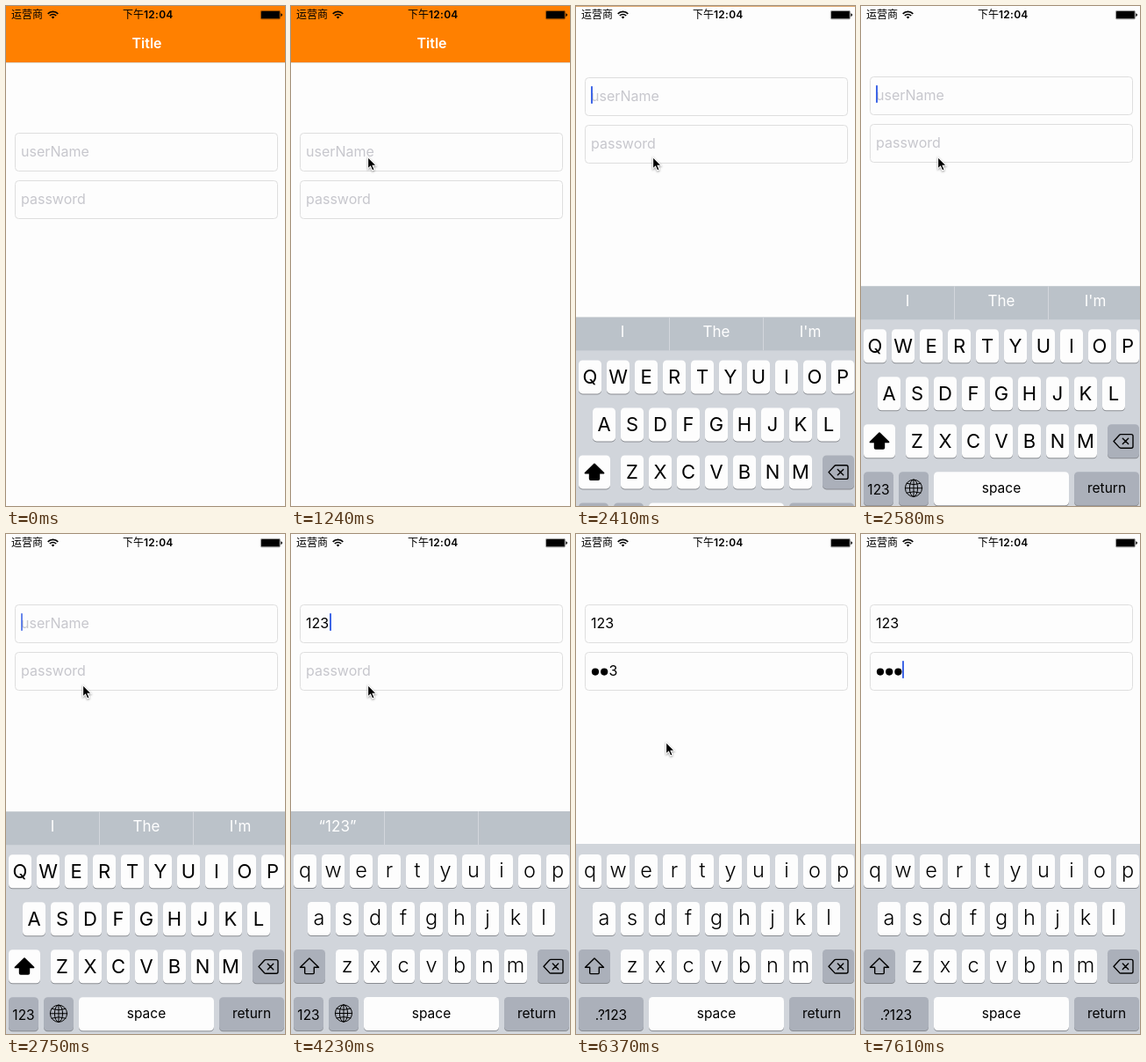
These frames come from a looping animation (318x568 px, 8250 ms). An HTML page:

```html
<!DOCTYPE html>
<html lang="zh-CN">
<head>
<meta charset="utf-8">
<title>Login form</title>
<style>
html, body { margin: 0; width: 100%; height: 100%; overflow: hidden; background: #fdfdfd; }
svg { display: block; width: 318px; height: 568px; font-family: Inter, "Noto Sans CJK SC", sans-serif; }
text { white-space: pre; }
.mid { text-anchor: middle; }
.field { font-size: 16px; }
.hint { fill: #c7c7cd; }
.box { fill: none; stroke: #dedede; }
.key { fill: #fdfdfd; }
.dark { fill: #abb0ba; }
.edge { fill: #898c91; }
.upper { font-size: 22px; }
.lower { font-size: 23.5px; font-weight: 300; }
.label { font-size: 15.5px; }
.tip { fill: #fff; font-size: 17px; }
.status { font-size: 12px; }
.title { font-size: 16px; font-weight: 600; fill: #fff; }
.line { fill: none; stroke: #000; stroke-width: 1.4; stroke-linejoin: round; stroke-linecap: round; }
</style>
</head>
<body>
<script>
const LOOP = 8250, TICK = 87.5;
const FOCUS_NAME = 2320, FOCUS_PASS = 4670, MASK = 7610;
const NAME_KEYS = [3440, 3620, 3890], PASS_KEYS = [5120, 5390, 5660];
const TOUCHES = [FOCUS_NAME, ...NAME_KEYS, FOCUS_PASS, ...PASS_KEYS, MASK];
const WORDS = ["I", "The", "I'm"];
const ROWS = [["qwertyuiop", 3], ["asdfghjkl", 19], ["zxcvbnm", 51]];
const ARROW = "M21 482 31.5 492.2H26.3V498.6Q26.3 499.6 25.3 499.6H16.7Q15.7 499.6 15.7 498.6V492.2H10.5Z";

const text = (x, y, s, cls = "", id = "") => `<text id="${id}" x="${x}" y="${y}" class="${cls}">${s}</text>`;
const group = (id, body) => `<g id="${id}">${body}</g>`;
const key = (x, y, w, cls = "key") =>
  `<rect class="edge" x="${x}" y="${y + 2}" width="${w}" height="37" rx="4.5"/>
   <rect class="${cls}" x="${x}" y="${y}" width="${w}" height="38" rx="4.5"/>`;
const label = (x, y, s) => text(x, y, s, "mid label");
const eachLetter = fn => ROWS.map(([s, x], row) =>
  [...s].map((c, i) => fn(c, x + 32 * i, 364 + 54 * row)).join("")).join("");

const status = `
  ${text(6, 14.4, "运营商", "status")}
  <g class="line" style="stroke-width:1.7;stroke-linecap:butt">
    <path d="M47.7 8.8a8.3 8.3 0 0 1 11.6 0M49.8 11a5.3 5.3 0 0 1 7.4 0"/>
    <path d="M51.7 12.5a2.6 2.6 0 0 1 3.6 0L53.5 14.4Z" fill="#000" stroke="none"/>
  </g>
  ${text(133, 14.4, '<tspan font-weight="500">下午</tspan><tspan font-weight="600" letter-spacing=".25">12:04</tspan>', "status")}
  <rect x="290.4" y="5.4" width="22" height="9.4" rx="1.2" fill="none" stroke="#000" stroke-width=".7" opacity=".6"/>
  <rect x="291" y="6" width="20.8" height="8.2" rx=".5"/>
  <path d="M313.3 8.2q1.7.4 1.7 1.9t-1.7 1.9z"/>`;

const nav = group("nav", `
  <rect width="318" height="64" fill="#ff8000"/>
  <rect y="64" width="318" height=".5" opacity=".25"/>
  ${text(160.5, 48, "Title", "mid title")}`);

const input = (id, y, hint) => `
  <rect class="box" x="10.5" y="${y + .5}" width="299" height="43" rx="4"/>
  ${text(17, y + 27, hint, "field hint", id + "Hint")}
  ${text(17, y + 27, "", "field", id)}`;

const form = group("form", input("name", 144, "userName") + input("pass", 198, "password")
  + group("dots", WORDS.map((_, i) => `<circle cx="${22 + 10.2 * i}" cy="220.6" r="4.1"/>`).join(""))
  + '<rect id="caret" width="2" height="20" rx=".8" fill="#3f66e6"/>');

const tips = group("tips", `
  <rect y="315" width="318" height="38" fill="#bbc2c9"/>
  <path d="M106.5 315v38M213.5 315v38" stroke="#d3d7dc"/>
  ${WORDS.map((s, i) => text(53 + 107 * i, 338, s, "mid tip", "tip" + i)).join("")}`);

const globe = `<g class="line" transform="translate(60 544.5)" style="stroke-width:1">
  <circle r="9.6"/><ellipse rx="4.6" ry="9.6"/>
  <path d="M-9.6 0H9.6M0-9.6V9.6M-8-5.4Q0-2.6 8-5.4M-8 5.4Q0 2.6 8 5.4"/></g>`;

const board = group("board", `
  <rect y="352" width="318" height="216" fill="#d1d5db"/>
  ${tips}
  ${eachLetter((c, x, y) => key(x, y, 26))}
  ${group("upper", eachLetter((c, x, y) => text(x + 13, y + 27, c.toUpperCase(), "mid upper"))
    + key(3, 472, 36) + `<path d="${ARROW}" stroke="#000" stroke-width="1.8" stroke-linejoin="round"/>`)}
  ${group("lower", eachLetter((c, x, y) => text(x + 13, y + 26, c, "mid lower"))
    + key(3, 472, 36, "dark") + `<path class="line" d="${ARROW}"/>`)}
  ${key(281, 472, 36, "dark")}
  <path class="line" d="M288 491.2 294.6 484Q295.2 483.4 296 483.4H308Q310 483.4 310 485.4V497Q310 499 308 499H296Q295.2 499 294.6 498.4ZM298.3 488 304.7 494.4M304.7 488 298.3 494.4"/>
  ${group("plainKeys", key(3, 526, 34, "dark") + key(43, 526, 34, "dark") + label(20, 552, "123") + globe)}
  ${group("secureKeys", key(3, 526, 74, "dark") + label(40, 552, ".?123"))}
  ${key(83, 526, 154)}${label(160, 550, "space")}
  ${key(243, 526, 74, "dark")}${label(280, 550, "return")}`);

const pointer = group("pointer", `
  <path d="M.7.8V15.2L3.9 12.2 6.2 17.4 8.7 16.3 6.5 11.2H10.9Z" transform="translate(0 .8) scale(.93)"
    stroke="#fff" stroke-width="1.1" style="filter:drop-shadow(0 1px 1px rgba(0,0,0,.4))"/>`);

document.body.innerHTML = `<svg viewBox="0 0 318 568">${nav}${form}${status}${board}${pointer}</svg>`;

const $ = id => document.getElementById(id);
const clamp = v => Math.min(1, Math.max(0, v));
const mix = (a, b, s) => a.map((v, i) => v + (b[i] - v) * s);
const show = (id, on) => $(id).style.display = on ? "" : "none";
const place = (id, x, y) => $(id).setAttribute("transform", `translate(${x} ${y})`);
const write = (id, s) => { if ($(id).textContent !== s) $(id).textContent = s; };
const typed = (keys, t) => keys.filter(k => k <= t).length;

// Progress from 0 to 1 in even jumps of one tick.
const stride = (t, from, to) =>
  clamp(Math.floor((t - from) / TICK + .05) / Math.round((to - from) / TICK));

// Share of a decaying slide that is left after the name field gets focus.
const left = (t, rate, lead) =>
  t < FOCUS_NAME ? 1 : Math.exp(-rate * (Math.floor((t - FOCUS_NAME) / 86) + lead));

function pointerAt(t) {
  const s = stride(t, 540, 1240), bend = [100, -33], rest = [87, 170];
  const arc = mix(mix([211, 295], bend, s), mix(bend, rest, s), s);
  const nudged = mix(arc, [94, 163], stride(t, 4235, 4410));
  const lowered = mix(nudged, [102, 235], stride(t, 5933, 6370));
  return mix(lowered, [296, 570], stride(t, 6552, 7340));
}

// The caret blinks anew after every touch.
function blink(t) {
  const last = TOUCHES.filter(k => k <= t).pop();
  if (last === undefined) return 0;
  const phase = (t - last) % 1050, fadeIn = t - last >= 950 ? clamp((phase - 950) / 100) : 0;
  return Math.max(clamp((590 - phase) / 200), fadeIn);
}

function render(t) {
  const n = typed(NAME_KEYS, t), p = typed(PASS_KEYS, t), secure = t >= FOCUS_PASS;
  const lift = 64 * (1 - left(t, 3, .35));
  place("nav", 0, -lift * 1.01);
  place("form", 0, -Math.round(lift));
  place("board", 0, 253 * left(t, 1.24, .52));
  show("board", t >= FOCUS_NAME);

  write("name", "123".slice(0, n));
  show("nameHint", !n);
  const dots = t >= MASK ? p : Math.max(0, p - 1);
  [...$("dots").children].forEach((dot, i) => dot.style.display = i < dots ? "" : "none");
  write("pass", "123".slice(dots, p));
  $("pass").setAttribute("x", 17 + 10.3 * dots);
  show("passHint", !p);

  const heard = typed(NAME_KEYS, t - 170);
  WORDS.forEach((word, i) => write("tip" + i, !heard ? word : i ? "" : `“${"123".slice(0, heard)}”`));
  show("tips", !secure);
  show("plainKeys", !secure);
  show("secureKeys", secure);
  show("upper", !n);
  show("lower", n);

  place("caret", 17 + (secure ? 10 * p : 9 * n), secure ? 208 : 154);
  $("caret").style.opacity = blink(t);
  show("pointer", t >= 540 && t < 7340);
  place("pointer", ...pointerAt(t));
}

const start = performance.now();
function frame() {
  render(Math.round(performance.now() - start) % LOOP);
  requestAnimationFrame(frame);
}
frame();
</script>
</body>
</html>
```
